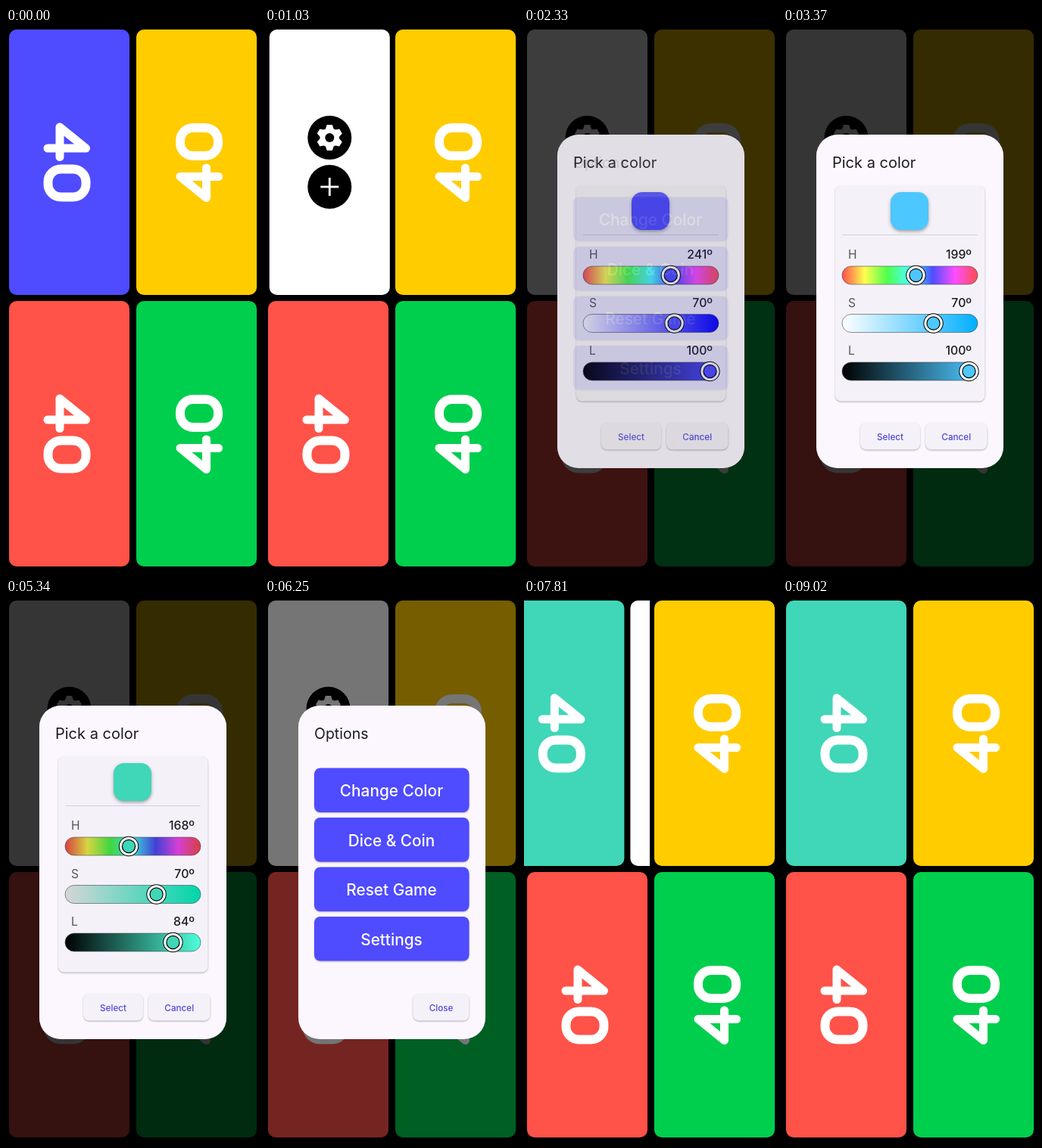
Animation of 334x718 px, one loop 9150 ms. Source, as an HTML page with a canvas:

```html
<!DOCTYPE html>
<html lang="en">
<head>
<meta charset="utf-8">
<title>Life counter</title>
<style>
html, body { margin: 0; width: 100%; height: 100%; overflow: hidden; background: #000; }
canvas { display: block; width: 334px; height: 718px; }
</style>
</head>
<body>
<canvas id="stage"></canvas>
<script>
const W = 334, H = 718, LOOP = 9150, FADE = 150;
const BLUE = '#4f4bff', RED = '#ff5249', YELLOW = '#ffcc00', GREEN = '#00cf4d';
const SURFACE = '#fcf7ff', CARD = '#f4f2f8', INK = '#1c1b20';
const FONT = 'Inter, Roboto, sans-serif';
const dpr = window.devicePixelRatio || 1;

function setup(canvas) {
  canvas.width = W * dpr;
  canvas.height = H * dpr;
  const c = canvas.getContext('2d');
  c.scale(dpr, dpr);
  return c;
}
const stage = setup(document.getElementById('stage'));
const sheet = document.createElement('canvas');
const layer = setup(sheet);

// Timing
const clamp = v => Math.max(0, Math.min(1, v));
const ramp = (t, start, length) => clamp((t - start) / length);
const inOut = v => v < 0.5 ? 4 * v ** 3 : 1 - 4 * (1 - v) ** 3;

function bezier(x1, y1, x2, y2) {
  const at = (a, b, s) => 3 * a * s * (1 - s) ** 2 + 3 * b * s * s * (1 - s) + s ** 3;
  return x => {
    let lo = 0, hi = 1;
    for (let i = 0; i < 24; i++) {
      const mid = (lo + hi) / 2;
      if (at(x1, x2, mid) < x) lo = mid; else hi = mid;
    }
    return at(y1, y2, lo);
  };
}
const ease = bezier(0.25, 0.1, 0.25, 1);
const easeOut = bezier(0, 0, 0.58, 1);

function track(t, keys) {
  for (let i = 1; i < keys.length; i++) {
    const [t0, v0] = keys[i - 1], [t1, v1] = keys[i];
    if (t < t1) return v0 + (v1 - v0) * ramp(t, t0, t1 - t0);
  }
  return keys[keys.length - 1][1];
}

function hsv(h, s, v) {
  const ch = n => {
    const k = (n + h / 60) % 6;
    return Math.round(255 * v / 100 * (1 - s / 100 * Math.max(0, Math.min(k, 4 - k, 1))));
  };
  return `rgb(${ch(5)},${ch(3)},${ch(1)})`;
}
const TEAL = hsv(168, 70, 84);

// Drawing helpers
function box(c, x, y, w, h, r, fill) {
  c.beginPath();
  c.roundRect(x, y, w, h, r);
  c.fillStyle = fill;
  c.fill();
}

function raised(c, x, y, w, h, r, fill, blur = 2, drop = 1, alpha = 0.3) {
  c.save();
  c.shadowColor = `rgba(0,0,0,${alpha})`;
  c.shadowBlur = blur * dpr;
  c.shadowOffsetY = drop * dpr;
  box(c, x, y, w, h, r, fill);
  c.restore();
}

function disc(c, x, y, r, fill) {
  c.beginPath();
  c.arc(x, y, r, 0, 2 * Math.PI);
  c.fillStyle = fill;
  c.fill();
}

function label(c, text, x, y, size, color, weight = 500, align = 'left') {
  c.font = `${weight} ${size}px ${FONT}`;
  c.textAlign = align;
  c.fillStyle = color;
  c.fillText(text, x, y);
}

// Ink splash clipped to a rounded box
function splash(c, t, start, x, y, w, h, r, rgb) {
  const grow = ramp(t, start, 300), fade = 1 - ramp(t, start + 250, 200);
  if (grow <= 0 || fade <= 0) return;
  c.save();
  c.beginPath();
  c.roundRect(x, y, w, h, r);
  c.clip();
  disc(c, x + w / 2, y + h / 2, w * 0.6 * easeOut(grow), `rgba(${rgb},${0.12 * fade})`);
  c.restore();
}

// "40" turned to face the left (dir = 1) or right (dir = -1) player
function score(c, x, y, dir) {
  c.save();
  c.translate(x, y);
  c.rotate(dir * Math.PI / 2);
  c.strokeStyle = '#fff';
  c.lineCap = c.lineJoin = 'round';
  c.lineWidth = 11;
  c.beginPath();
  c.moveTo(-18, 25.5);
  c.lineTo(-18, -25);
  c.lineTo(-46, 9.5);
  c.lineTo(-6.5, 9.5);
  c.stroke();
  c.lineWidth = 12;
  c.beginPath();
  c.roundRect(9.5, -25, 37, 50, 17);
  c.stroke();
  c.restore();
}

function panel(c, x, y, color) {
  box(c, x, y, 159, 351, 10, color);
}

function gear(c, x, y) {
  c.save();
  c.translate(x, y);
  disc(c, 0, 0, 12.8, '#fff');
  for (let i = 0; i < 6; i++) {
    c.beginPath();
    c.moveTo(-5.5, -11);
    c.lineTo(-3.6, -17);
    c.lineTo(3.6, -17);
    c.lineTo(5.5, -11);
    c.fill();
    c.rotate(Math.PI / 3);
  }
  disc(c, 0, 0, 6, '#000');
  c.restore();
}

function menuPage(c, t) {
  panel(c, 4, 2, '#fff');
  disc(c, 83.5, 145, 29, '#000');
  gear(c, 83.5, 145);
  splash(c, t, 1180, 54.5, 116, 58, 58, 29, '255,255,255');
  disc(c, 83.5, 210, 29, '#000');
  c.fillStyle = '#fff';
  c.fillRect(71.5, 208.6, 24, 2.8);
  c.fillRect(82.1, 198, 2.8, 24);
}

function board(c, t) {
  c.fillStyle = '#000';
  c.fillRect(0, 0, W, H);
  panel(c, 172, 2, YELLOW);
  score(c, 255, 178.5, -1);
  panel(c, 4, 361, RED);
  score(c, 80.5, 536, 1);
  panel(c, 172, 361, GREEN);
  score(c, 255, 537.5, -1);

  const page = 167 * (inOut(ramp(t, 480, 640)) - inOut(ramp(t, 7400, 640)));
  c.save();
  c.beginPath();
  c.rect(0, 0, 166, 357);
  c.clip();
  c.translate(-page, 0);
  panel(c, 4, 2, t < 6000 ? BLUE : TEAL);
  score(c, 80.5, 177, 1);
  c.translate(167, 0);
  menuPage(c, t);
  c.restore();
}

function smallButton(c, text, x, w, t, press) {
  raised(c, x, 522, w, 35.5, 8, CARD);
  splash(c, t, press, x, 522, w, 35.5, 8, '79,75,255');
  label(c, text, x + w / 2, 545, 11.7, '#4f46e0', 500, 'center');
}

function optionsDialog(c, t) {
  box(c, 44, 141, 247, 441, 28, SURFACE);
  label(c, 'Options', 65, 185, 19.5, INK, 400);
  ['Change Color', 'Dice & Coin', 'Reset Game', 'Settings'].forEach((text, i) => {
    const y = 223.5 + 65.5 * i;
    raised(c, 65, y, 204.5, 58.5, 8, BLUE);
    if (!i) splash(c, t, 1960, 65, y, 204.5, 58.5, 8, '255,255,255');
    label(c, text, 167, y + 37.5, 20.8, '#fff', 500, 'center');
  });
  smallButton(c, 'Close', 195.5, 74, t, 6680);
}

function slider(c, y, name, value, max, stops, color) {
  label(c, name, 86, y - 22, 15.5, '#55545c', 400);
  label(c, Math.round(value) + 'º', 249, y - 22, 15.8, INK, 500, 'right');
  const g = c.createLinearGradient(78, 0, 257, 0);
  stops.forEach((s, i) => g.addColorStop(i / (stops.length - 1), s));
  box(c, 78, y - 12, 179, 24, 12, g);
  c.beginPath();
  c.roundRect(78, y - 12, 179, 24, 12);
  c.lineWidth = 1;
  c.strokeStyle = 'rgba(70,70,80,.6)';
  c.stroke();
  const x = 89 + 156.5 * value / max;
  disc(c, x, y, 13.2, '#000');
  disc(c, x, y, 12.2, '#fff');
  disc(c, x, y, 9.2, '#000');
  disc(c, x, y, 8, color);
}

function pickerDialog(c, t) {
  const h = track(t, [[2830, 241], [3370, 199], [3780, 172], [3920, 169], [4190, 168]]);
  const s = 70;
  const l = track(t, [[4620, 100], [5280, 84]]);
  const color = hsv(h, s, l);
  box(c, 44, 141, 247, 441, 28, SURFACE);
  label(c, 'Pick a color', 65, 185, 20, INK, 400);
  raised(c, 69, 208, 197.5, 285.5, 8, CARD);
  raised(c, 142, 217, 50, 50, 14, color, 4, 2, 0.35);
  c.fillStyle = '#d2d0d8';
  c.fillRect(78, 273, 179, 1);
  const hues = Array.from({ length: 13 }, (_, i) => hsv(i * 30 % 360, s, l));
  slider(c, 327, 'H', h, 360, hues, color);
  slider(c, 390.5, 'S', s, 100, [hsv(h, 0, l), hsv(h, 100, l)], color);
  slider(c, 454, 'L', l, 100, ['#000', hsv(h, s, 100)], color);
  smallButton(c, 'Select', 102, 79, t, 5610);
  smallButton(c, 'Cancel', 188, 81.5, t, LOOP);
}

// Dim what is below, then fade the whole dialog in or out as one layer
function modal(t, open, close, draw) {
  const v = ramp(t, open, FADE) - ramp(t, close, FADE);
  if (v <= 0) return;
  stage.fillStyle = `rgba(0,0,0,${0.54 * ease(v)})`;
  stage.fillRect(0, 0, W, H);
  layer.clearRect(0, 0, W, H);
  draw(layer, t);
  stage.globalAlpha = easeOut(v);
  stage.drawImage(sheet, 0, 0, W, H);
  stage.globalAlpha = 1;
}

const begin = performance.now();
function tick() {
  const t = (performance.now() - begin) % LOOP;
  board(stage, t);
  modal(t, 1420, 6920, optionsDialog);
  modal(t, 2240, 6050, pickerDialog);
  requestAnimationFrame(tick);
}
tick();
</script>
</body>
</html>
```
